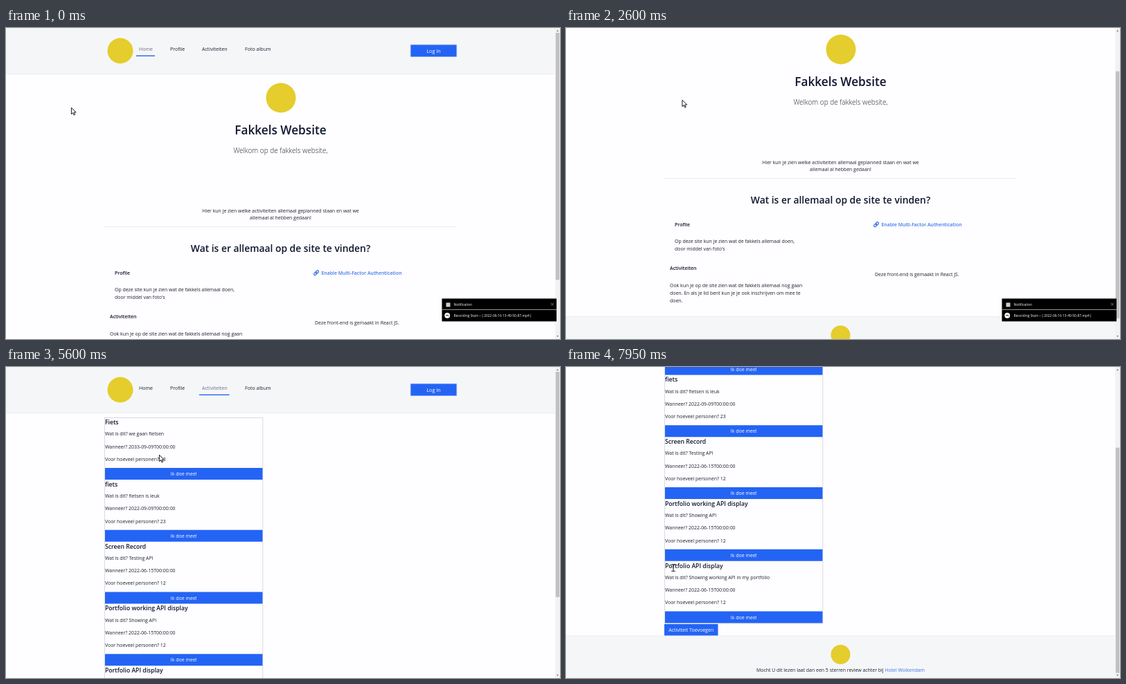
Write an HTML page that moves like this. It is 800 px wide and 450 px high and loops after 8000 ms.

```html
<!DOCTYPE html>
<html lang="nl">
<head>
<meta charset="utf-8">
<title>Fakkels Website</title>
<style>
html, body { margin: 0; width: 100%; height: 100%; overflow: hidden; background: #fefdff; }
svg { display: block; width: 800px; height: 450px; font-family: "Open Sans", "Noto Sans", sans-serif; }
text { white-space: pre; }
</style>
</head>
<body>
<svg id="stage" viewBox="0 0 800 450"></svg>
<script>
const NS = "http://www.w3.org/2000/svg";
const INK = "#1c2230", NAVY = "#10172e", BLUE = "#2464f5", HOVER = "#2059e4", LINK = "#3b78e8";
const LOGO = "#e4cd2c", PANEL = "#f5f6f8", LINE = "#e8eaee";
const stage = document.getElementById("stage");

function el(parent, tag, attrs, content) {
  const node = document.createElementNS(NS, tag);
  for (const k in attrs) node.setAttribute(k, attrs[k]);
  if (content) node.textContent = content;
  parent.appendChild(node);
  return node;
}
const group = parent => el(parent, "g", {});
const rect = (p, x, y, w, h, fill, more) => el(p, "rect", { x, y, width: w, height: h, fill, ...more });
const circle = (p, cx, cy, r, fill) => el(p, "circle", { cx, cy, r, fill });
const path = (p, d, more) => el(p, "path", { d, ...more });
const text = (p, x, y, str, size = 6.95, more = {}) =>
  el(p, "text", { x, y, "font-size": size, fill: INK, ...more }, str);
const MID = { "text-anchor": "middle" };
const BOLD = { "font-weight": 600, fill: NAVY };
const show = (node, on) => node.setAttribute("display", on ? "inline" : "none");
const shift = (node, x, y) => node.setAttribute("transform", `translate(${x} ${y})`);

function button(p, x, y, w, h, label, size = 7) {
  const box = rect(p, x, y, w, h, BLUE, { rx: 0.5 });
  text(p, x + w / 2, y + h / 2 + 2.6, label, size, { ...MID, fill: "#fff" });
  return box;
}

function header(p, active) {
  rect(p, 0, 0, 793, 66, PANEL);
  rect(p, 0, 66, 793, 0.8, LINE);
  circle(p, 165, 33, 18.5, LOGO);
  const items = [["Home", 192, 27], ["Profile", 237, 30], ["Activiteiten", 283, 43.5], ["Foto album", 345, 44]];
  items.forEach(([label, x, w], i) => {
    text(p, x, 33.3, label, 7.1, { fill: i === active ? "#6b7280" : INK });
    if (i === active) rect(p, x - 4, 39.6, w, 1.4, BLUE);
  });
  const login = button(p, 584.3, 24.3, 66.4, 17.2, "Log In", 7.3);
  login.setAttribute("stroke", "#7ba2f9");
  login.setAttribute("stroke-width", 0.7);
}

function footer(p) {
  const g = group(p);
  rect(g, 0, 0, 793, 62, PANEL);
  rect(g, 0, -0.3, 793, 0.8, LINE);
  circle(g, 396.5, 27, 14, LOGO);
  const line = text(g, 396.5, 52.4, "Mocht U dit lezen laat dan een 5 sterren review achter bij ", 6.95, MID);
  el(line, "tspan", { fill: LINK }, "Hotel Wolkendam");
  return g;
}

// Home page
const home = group(stage);
header(home, 0);
const hoverLine = rect(home, 279, 39.6, 43.5, 1.2, "#d1d5db");
circle(home, 397, 101, 21.5, LOGO);
text(home, 396.5, 153.8, "Fakkels Website", 17.2, { ...MID, ...BOLD });
text(home, 396.5, 181.4, "Welkom op de fakkels website,", 10, { ...MID, "font-weight": 300 });
text(home, 396.5, 266.5, "Hier kun je zien welke activiteiten allemaal geplanned staan en wat we", 6.95, MID);
text(home, 396.5, 277.2, "allemaal al hebben gedaan!", 6.95, MID);
rect(home, 142, 287, 509, 0.8, LINE);
text(home, 396.5, 324, "Wat is er allemaal op de site te vinden?", 13.85, { ...MID, ...BOLD });
text(home, 157, 356.6, "Profile", 7, BOLD);
text(home, 157, 381.3, "Op deze site kun je zien wat de fakkels allemaal doen,");
text(home, 157, 392.2, "door middel van foto's");
text(home, 150, 420.4, "Activiteiten", 7, BOLD);
["Ook kun je op de site zien wat de fakkels allemaal nog gaan",
 "doen. En als je lid bent kun je je ook inschrijven om mee te",
 "doen."].forEach((s, i) => text(home, 150, 445.1 + i * 10.9, s));
text(home, 455.5, 356.7, "Enable Multi-Factor Authentication", 6.9, { "font-weight": 600, fill: LINK });
const chain = el(home, "g", { transform: "translate(448 354.2) rotate(-45)", fill: "none", stroke: LINK, "stroke-width": 1.3 });
for (const x of [-4.2, -0.8]) rect(chain, x, -1.6, 5, 3.2, "none", { rx: 1.6 });
text(home, 446, 428.5, "Deze front-end is gemaakt in React JS.");
shift(footer(home), 0, 487.5);

// Activities page
const events = [
  ["Fiets", "we gaan fietsen", "2033-09-09", 23],
  ["fiets", "fietsen is leuk", "2022-09-09", 23],
  ["Screen Record", "Testing API", "2022-06-15", 12],
  ["Portfolio working API display", "Showing API", "2022-06-15", 12],
  ["Portfolio API display", "Showing working API in my portfolio", "2022-06-15", 12]
];
const PITCH = 89.75;
const acts = group(stage);
header(acts, 2);
const list = group(acts);
rect(list, 142.4, 73.4, 228.4, 449, "none", { stroke: "#cfd4db", "stroke-width": 0.8 });
const joins = events.map(([title, what, day, count], i) => {
  const card = group(list);
  shift(card, 0, i * PITCH);
  text(card, 143, 83.2, title, 8.65, BOLD);
  text(card, 143, 99.3, "Wat is dit? " + what);
  text(card, 143, 117.5, `Wanneer? ${day}T00:00:00`);
  text(card, 143, 135.8, "Voor hoeveel personen? " + count);
  return button(card, 143, 146, 227.5, 17, "Ik doe mee!");
});
const tail = group(acts);
button(tail, 142, 523.5, 77.5, 16.7, "Activiteit Toevoegen");
shift(footer(tail), 0, 540.5);

// Scrollbar
const bar = group(stage);
rect(bar, 793, 0, 7, 450, "#f2f2f3");
path(bar, "M795 4.8L796.5 3L798 4.8ZM795 445.2L796.5 447L798 445.2Z", { fill: "#606060" });
const thumb = rect(bar, 793.8, 7, 5.4, 357, "#c1c1c2");

// Notification
const note = group(stage);
rect(note, 629.5, 391.5, 165.5, 33, "#000");
rect(note, 629.5, 407.2, 165.5, 0.8, "#bbb");
rect(note, 635.5, 397.5, 6, 6, "#d8c9c4");
text(note, 646.5, 401.9, "Notification", 4.9, { fill: "#fff" });
path(note, "M786.8 397.7L790.8 401.7M790.8 397.7L786.8 401.7", { stroke: "#bbb", "stroke-width": 0.6 });
circle(note, 637.2, 416, 3.9, "#fff");
path(note, "M635.3 417L637.2 415L639.1 417", { fill: "none", stroke: "#000", "stroke-width": 1 });
text(note, 646.5, 417.9, "Recording Start--- ( 2022-06-16 13-49-50-87.mp4 )", 4.9, { fill: "#fff" });

// Pointers, each with its hot spot at 0,0
const mouse = group(stage);
const outline = { fill: "#fff", stroke: "#000", "stroke-width": 0.9, "stroke-linejoin": "round" };
const arrow = path(mouse, "M0.4 0.3V9.6L2.6 7.6L4.1 11L5.7 10.3L4.2 7H7.2Z", outline);
const hand = path(mouse, "M-0.9 6.6V0.4Q0 -0.9 0.9 0.4V4L5 5Q5.9 5.3 5.8 6.3L5.2 9.2L4.4 11.8H-0.4L-3 7.6Q-3 6.2 -1.8 6.5L-0.9 7.6Z", outline);
const beam = path(mouse, "M-2.8 -5H-0.7L0 -4.4L0.7 -5H2.8M-2.8 5H-0.7L0 4.4L0.7 5H2.8M0 -4.4V4.4", { fill: "none", stroke: "#333", "stroke-width": 1.2 });

// Keys: time, then values
const scrollHome = [[850, 0], [1050, 41.7], [1150, 46.5], [1350, 83.3], [1550, 83.3], [1750, 99], [2450, 99],
  [2600, 70], [2700, 57.3], [2800, 15.6], [2950, 0]];
const scrollActs = [[6350, 0], [6550, 41.7], [6750, 41.7], [6950, 83.3], [7000, 83.3], [7100, 111.5],
  [7200, 125], [7400, 125], [7600, 151.5]];
const trail = [[0, 94, 115], [250, 65, 72], [550, 65, 72], [1150, 132, 52], [1450, 132, 56], [1800, 114, 80],
  [2250, 150, 94], [2550, 167.5, 104], [3200, 167.5, 104], [3400, 225, 50], [3900, 306, 32], [4450, 306, 32],
  [5250, 240, 88], [5600, 221, 127], [6100, 116, 200], [6500, 118, 215], [6950, 156, 229],
  [7200, 156, 229], [7750, 152, 263], [7850, 152, 263], [7950, 155, 290.5]];

function at(keys, t, ease = u => u) {
  const i = keys.findIndex(k => k[0] > t);
  if (i === 0) return keys[0].slice(1);
  if (i < 0) return keys[keys.length - 1].slice(1);
  const a = keys[i - 1], b = keys[i], u = ease((t - a[0]) / (b[0] - a[0]));
  return a.slice(1).map((v, n) => v + (b[n + 1] - v) * u);
}
const smooth = u => u * u * (3 - 2 * u);

function draw(t) {
  const onHome = t < 4200, loaded = t >= 4450;
  const [y] = at(onHome ? scrollHome : scrollActs, t);
  const [mx, my] = at(trail, t, smooth);
  show(home, onHome);
  show(acts, !onHome);
  shift(onHome ? home : acts, 0, -y);
  show(hoverLine, t >= 3800);
  show(list, loaded);
  shift(tail, 0, loaded ? 0 : -450);
  show(note, t < 5400);

  const ratio = 436 / (onHome ? 549 : 602);
  show(bar, onHome || loaded);
  thumb.setAttribute("y", 7 + y * ratio);
  thumb.setAttribute("height", 450 * ratio);

  const overText = t >= 7850;
  const overLink = !overText && (t >= 6950 || (t >= 3800 && t < 4600));
  shift(mouse, mx, my);
  show(arrow, !overLink && !overText);
  show(hand, overLink);
  show(beam, overText);
  joins.forEach((box, i) => {
    const top = 146 + i * PITCH - y;
    const hovered = overLink && !onHome && my >= top && my <= top + 17;
    box.setAttribute("fill", hovered ? HOVER : BLUE);
  });
}

function tick() {
  draw(Math.floor(performance.now() % 8000 / 50) * 50);
  requestAnimationFrame(tick);
}
tick();
</script>
</body>
</html>
```
